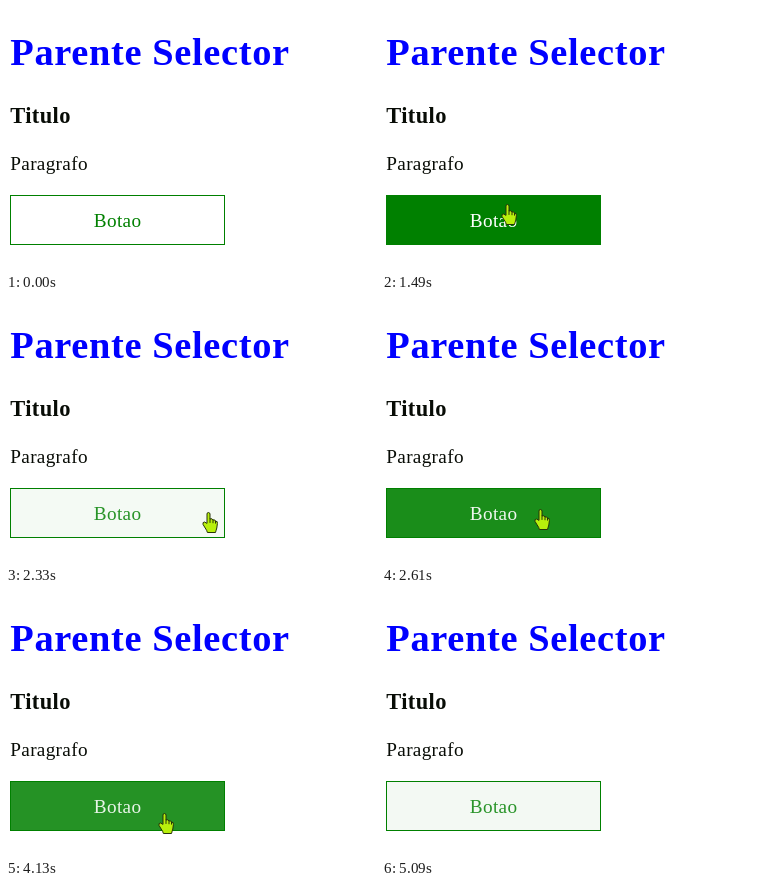
An HTML page for the animation above (5420 ms loop, 370x265 px).

```html
<!DOCTYPE html>
<html lang="pt">
<head>
<meta charset="utf-8">
<title>Parente Selector</title>
<style>
  html, body { margin: 0; width: 100%; height: 100%; overflow: hidden; background: #fff; }
  svg { display: block; font: 19.2px "Liberation Serif", "Times New Roman", serif; fill: #080c06; }
  text { letter-spacing: .017em; }
  .title { font-size: 2em; font-weight: bold; fill: #00f; }
  .subtitle { font-size: 1.17em; font-weight: bold; }
  .frame { fill: none; stroke: #008000; }
  .cursor { stroke-linejoin: round; stroke-linecap: round; }
  #hand { fill: #b8f00c; stroke: #26330a; }
  #arrow { fill: #a8ee14; stroke: #56704a; }
</style>
</head>
<body>
<svg width="370" height="265" viewBox="0 0 370 265">
  <text class="title" x="4.3" y="59">Parente Selector</text>
  <text class="subtitle" x="4.3" y="117">Titulo</text>
  <text x="4.3" y="164">Paragrafo</text>
  <rect id="fill" x="5" y="190" width="213" height="48"/>
  <rect class="frame" x="4.5" y="189.5" width="214" height="49"/>
  <text id="label" x="111.6" y="221" text-anchor="middle">Botao</text>
  <g class="cursor" id="cursor">
    <g id="hand">
      <path d="M-2 11V2Q-2 .5 -.6 .5T1 2V7Q3.4 6 4 8Q6 7.2 6.5 9.2Q8.8 8.8 8.4 11.5L7.8 16Q7.2 18 6.5 20.5H-1.6Q-2 18.5 -3.8 16L-6 12.4Q-6.6 10 -4.8 10Z"/>
      <path d="M1 7V10.5M4 8V10.8M6.5 9.2V11.2" fill="none"/>
    </g>
    <path id="arrow" d="M.5 .8V17.3L4.3 13.8L7 19.6L9.4 18.5L6.9 12.9H12.3Z"/>
  </g>
</svg>
<script>
  const LOOP = 5420, STEP = 70, FADE = 500;
  // Bursts of stepped motion; the picture holds between them.
  const bursts = [[530, 1160], [1420, 2810], [3080, 4340], [4670, 5090]];
  // Pointer glides from rest to rest
  const home = { x: 88, y: 270 };
  const glides = [
    { at: 444, time: 470, x: 93, y: 194 },
    { at: 1382, time: 460, x: 332, y: 222 },
    { at: 2022, time: 460, x: 159, y: 210 },
    { at: 2980, time: 400, x: 294, y: 236 },
    { at: 3624, time: 420, x: 159, y: 221 },
    { at: 4570, time: 400, x: 300, y: 275 }
  ];
  const $ = id => document.getElementById(id);
  const mix = (a, b, k) => a + (b - a) * k;
  const smooth = p => p * p * (3 - 2 * p);
  const isInside = ({ x, y }) => x >= 4 && x < 219 && y >= 189 && y < 239;

  // cubic-bezier(.25, .1, .25, 1)
  function ease(p) {
    if (p >= 1) return 1;
    const curve = (a, b, u) => 3 * a * u * (1 - u) ** 2 + 3 * b * u * u * (1 - u) + u ** 3;
    let lo = 0, hi = 1;
    for (let i = 0; i < 20; i++) {
      const mid = (lo + hi) / 2;
      if (curve(.25, .25, mid) < p) lo = mid; else hi = mid;
    }
    return curve(.1, 1, lo);
  }

  function stepped(t) {
    const burst = bursts.filter(([start]) => start <= t).pop();
    if (!burst) return 0;
    const [start, end] = burst;
    return Math.min(end, start + Math.floor((t - start) / STEP) * STEP);
  }

  function pointerAt(t) {
    let { x, y } = home;
    for (const g of glides) {
      const k = smooth(Math.min(1, Math.max(0, (t - g.at) / g.time)));
      x = mix(x, g.x, k);
      y = mix(y, g.y, k);
    }
    return { x, y };
  }

  // Moments at which the pointer enters or leaves the button
  const crossings = [];
  for (let t = 1; t < LOOP; t++) {
    if (isInside(pointerAt(t)) !== isInside(pointerAt(t - 1))) crossings.push(t);
  }

  function hoverAt(t) {
    const count = crossings.filter(time => time <= t).length;
    if (!count) return 0;
    const k = ease((t - crossings[count - 1]) / FADE);
    return count % 2 ? k : 1 - k;
  }

  function draw(now) {
    const t = stepped(now % LOOP);
    const pointer = pointerAt(t);
    const hover = hoverAt(t);
    const white = hover ** .6;
    const inside = isInside(pointer);
    const c = Math.round(255 * white);
    $("fill").setAttribute("fill", `rgba(0, 128, 0, ${hover})`);
    $("label").setAttribute("fill", `rgb(${c}, ${Math.round(mix(128, 255, white))}, ${c})`);
    $("cursor").setAttribute("transform", `translate(${Math.round(pointer.x)} ${Math.round(pointer.y)})`);
    $("hand").style.display = inside ? "" : "none";
    $("arrow").style.display = inside ? "none" : "";
  }

  const begin = performance.now();
  function tick() {
    draw(performance.now() - begin);
    requestAnimationFrame(tick);
  }
  tick();
</script>
</body>
</html>
```
